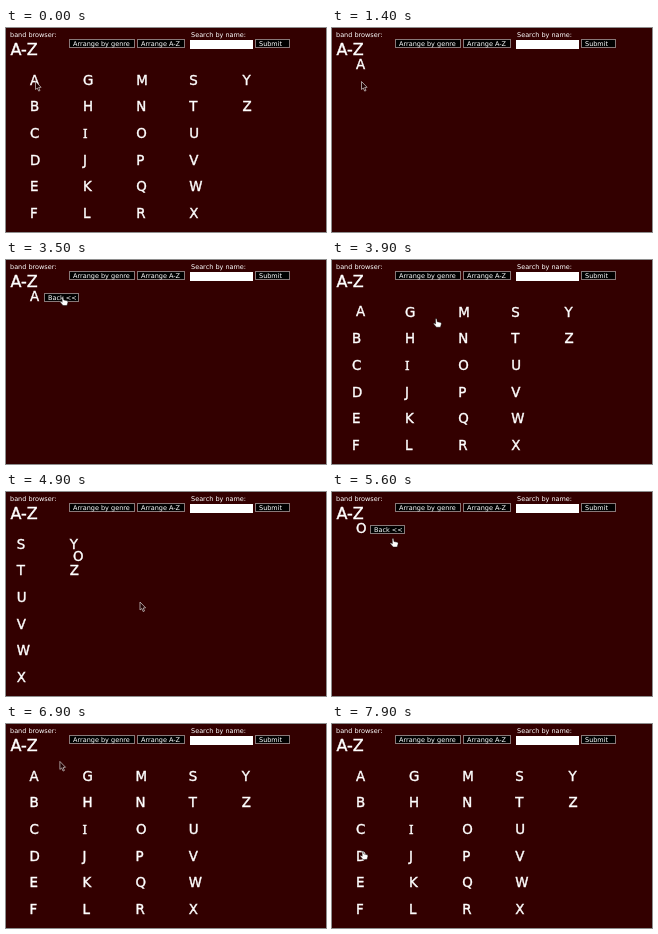
An HTML page with a canvas that plays this animation: 320x204 px, repeating every 8 s.

```html
<!DOCTYPE html>
<html lang="en">
<head>
<meta charset="utf-8">
<title>Band browser</title>
<style>
html, body { margin: 0; width: 100%; height: 100%; overflow: hidden; background: #300; }
canvas { display: block; }
</style>
</head>
<body>
<canvas id="stage" width="320" height="204"></canvas>
<script>
const ctx = document.getElementById('stage').getContext('2d');
const LOOP = 8000, EASE = 84, SLIDE = 290, BACK_DELAY = 600;
const LETTERS = [...'ABCDEFGHIJKLMNOPQRSTUVWXYZ'];
const SANS = '"DejaVu Sans"', SERIFED = '"Noto Sans"';

// Each visit: the letter picked, when it is clicked, when Back is clicked
const [first, second] = [
  { letter: 'A', open: 1100, close: 3541 },
  { letter: 'O', open: 4825, close: 6381 }
];

// The pointer travels to each stop between start and end, and clicks there
const back = { x: 57, y: 37 };
const stops = [
  { x: 29.5, y: 53.5, start: -1, end: 0, click: 0 },
  { ...back, start: 1900, end: 2600, click: first.close },
  { x: 134, y: 110, start: 3560, end: 4150, click: second.open },
  { ...back, start: 5000, end: 5700, click: second.close },
  { x: 31, y: 127, start: 6750, end: 7450, click: LOOP }
];

function text(str, x, y, size = 6.5, weight = 0, family = SANS) {
  ctx.font = `${size}px ${family}, sans-serif`;
  ctx.fillStyle = ctx.strokeStyle = '#fff';
  ctx.fillText(str, x, y);
  if (!weight) return;
  ctx.lineWidth = weight;
  ctx.strokeText(str, x, y);
}

function button(label, x, y, w) {
  ctx.fillStyle = '#000';
  ctx.fillRect(x, y, w, 9);
  ctx.strokeStyle = '#887878';
  ctx.lineWidth = 1;
  ctx.strokeRect(x + .5, y + .5, w - 1, 8);
  text(label, x + 4, y + 7);
}

function polygon(points, fill, stroke) {
  ctx.beginPath();
  for (let i = 0; i < points.length; i += 2) ctx.lineTo(points[i], points[i + 1]);
  ctx.closePath();
  ctx.fillStyle = fill;
  ctx.strokeStyle = stroke;
  ctx.lineWidth = .8;
  ctx.fill();
  ctx.stroke();
}

function header() {
  text('band browser:', 4, 8.5);
  text('A-Z', 4.5, 26.7, 16, .4);
  button('Arrange by genre', 63, 11, 66);
  button('Arrange A-Z', 131, 11, 48);
  text('Search by name:', 185, 9);
  ctx.fillStyle = '#fff';
  ctx.fillRect(184, 12, 63, 9);
  button('Submit', 249, 11, 35);
}

// 0 = full grid, 1 = one letter open
function openness(t, { open, close }) {
  if (t < open) return 0;
  return t < close ? 1 - Math.exp((open - t) / EASE) : Math.exp((close - t) / EASE);
}

function letters(t) {
  const visit = t < 4500 ? first : second;
  const p = openness(t, visit);
  LETTERS.forEach((ch, i) => {
    let x = 24 + 53.1 * Math.floor(i / 6);
    let y = 56.6 + 26.7 * (i % 6);
    if (ch === visit.letter) {
      x += (24 - x) * p;
      y += (41 - y) * p;
    } else {
      x -= SLIDE * p;
    }
    text(ch, x, y, 13.4, .4, ch === 'I' ? SERIFED : SANS);
  });
  if (t > visit.open + BACK_DELAY && t < visit.close) button('Back <<', 38, 33, 35);
}

function pointer(t) {
  const i = stops.findLastIndex(s => t >= s.start);
  const to = stops[i], from = stops[i - 1] || to;
  const s = Math.min(1, (t - to.start) / (to.end - to.start));
  const u = s * s * (3 - 2 * s);
  ctx.save();
  ctx.translate(from.x + (to.x - from.x) * u, from.y + (to.y - from.y) * u ** 2.5);
  if (u > .5 && t < to.click)
    polygon([-1, 0, .4, 0, .8, 3, 4.5, 3.8, 5, 5, 4, 8.5, 0, 8.5, -3, 5, -2.4, 4.2, -.8, 5.2], '#fff', '#0008');
  else
    polygon([0, 0, 0, 8, 1.8, 6.5, 3.2, 9.6, 4.5, 9, 3.2, 6, 5.6, 5.8], '#200', '#c4bcbc');
  ctx.restore();
}

function frame() {
  const t = performance.now() % LOOP;
  ctx.fillStyle = '#300';
  ctx.fillRect(0, 0, 320, 204);
  header();
  letters(t);
  pointer(t);
  requestAnimationFrame(frame);
}
frame();
</script>
</body>
</html>
```
